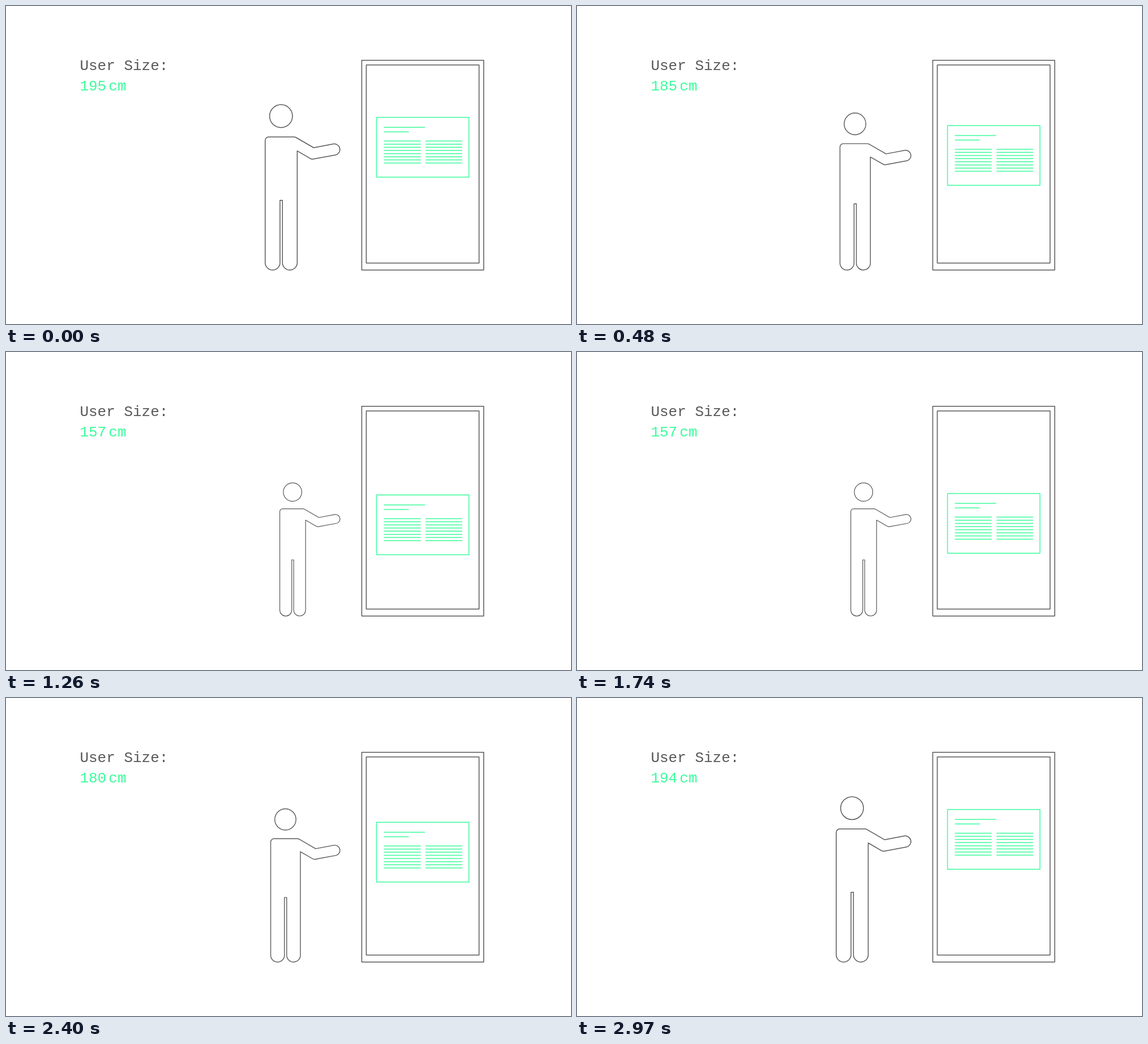
Recreate the animation shown at these times as an HTML page. Size 998x561 px, loop 3000 ms.

```html
<!DOCTYPE html>
<html lang="en">
<head>
<meta charset="utf-8">
<title>User size</title>
<style>
  html, body { margin: 0; width: 100%; height: 100%; overflow: hidden; background: #fff; }
  svg { display: block; width: 998px; height: 561px; }
  .ink { fill: none; stroke: #5a5858; stroke-width: 1.5; stroke-linejoin: round; }
  .mint { fill: none; stroke: #3dfc9c; stroke-width: 1.5; }
  text { font: 26px "Liberation Mono", monospace; fill: #5a5858; }
  .value { fill: #3dfc9c; }
</style>
</head>
<body>
<svg viewBox="0 0 998 561">
  <text x="130.4" y="113.3">User Size:</text>
  <text class="value" x="130.4" y="149" id="size">195</text>
  <text class="value" x="181.3" y="149">cm</text>
  <g class="ink">
    <rect x="628.4" y="95.7" width="215.4" height="370"/>
    <rect x="636.4" y="103.9" width="199.2" height="349.7"/>
  </g>
  <g class="ink" id="person">
    <circle cx="485.8" cy="194.3" r="20.2"/>
    <path d="M457.8 237.2a6.2 6.2 0 0 1 6.2-6.2H508.5q2 0 3.8 1L543.5 250L578.9 243.3a9.9 9.9 0 0 1 3.6 19.4L542.5 270.1q-2.4.4-4.5-.8L514.4 255.7V452.7a13.05 13.05 0 0 1-26.1 0V342.8H484V452.7a13.1 13.1 0 0 1-26.2 0Z"/>
  </g>
  <g class="mint" id="panel">
    <rect x="654.5" y="196.5" width="163.2" height="105.4"/>
    <path id="lines"/>
  </g>
</svg>
<script>
const $ = id => document.getElementById(id);
const LOOP = 3000, HALF = LOOP / 2, STEP = 30;
const FOOT = [590.4, 465.8];

let d = "M667.5 214H740M667.5 222H711.5";
for (let i = 0; i < 8; i++) {
  const y = 238.2 + i * 5.55;
  d += `M667.5 ${y}H732.5M741 ${y}H805.8`;
}
$("lines").setAttribute("d", d);

const smooth = s => s * s * (3 - 2 * s);

// cubic-bezier(1/6, 0, 5/6, 1)
function brisk(x) {
  let lo = 0, hi = 1;
  for (let i = 0; i < 24; i++) {
    const s = (lo + hi) / 2;
    if (s / 2 + 1.5 * s * s - s ** 3 < x) lo = s; else hi = s;
  }
  return smooth((lo + hi) / 2);
}

function draw() {
  const t = Math.floor(performance.now() % LOOP / STEP) * STEP;
  const down = t <= HALF;
  const k = smooth(down ? t / HALF : (LOOP - t) / HALF);
  const drop = down ? k : 1 - brisk((t - HALF) / HALF);
  const [x, y] = FOOT;

  $("size").textContent = Math.floor(195 - 40 * k);
  $("person").setAttribute("transform",
    `translate(${x} ${y}) scale(${1 - 0.209 * k}) translate(${-x} ${-y})`);
  $("panel").setAttribute("transform", `translate(0 ${59.8 * drop})`);
  requestAnimationFrame(draw);
}
draw();
</script>
</body>
</html>
```
